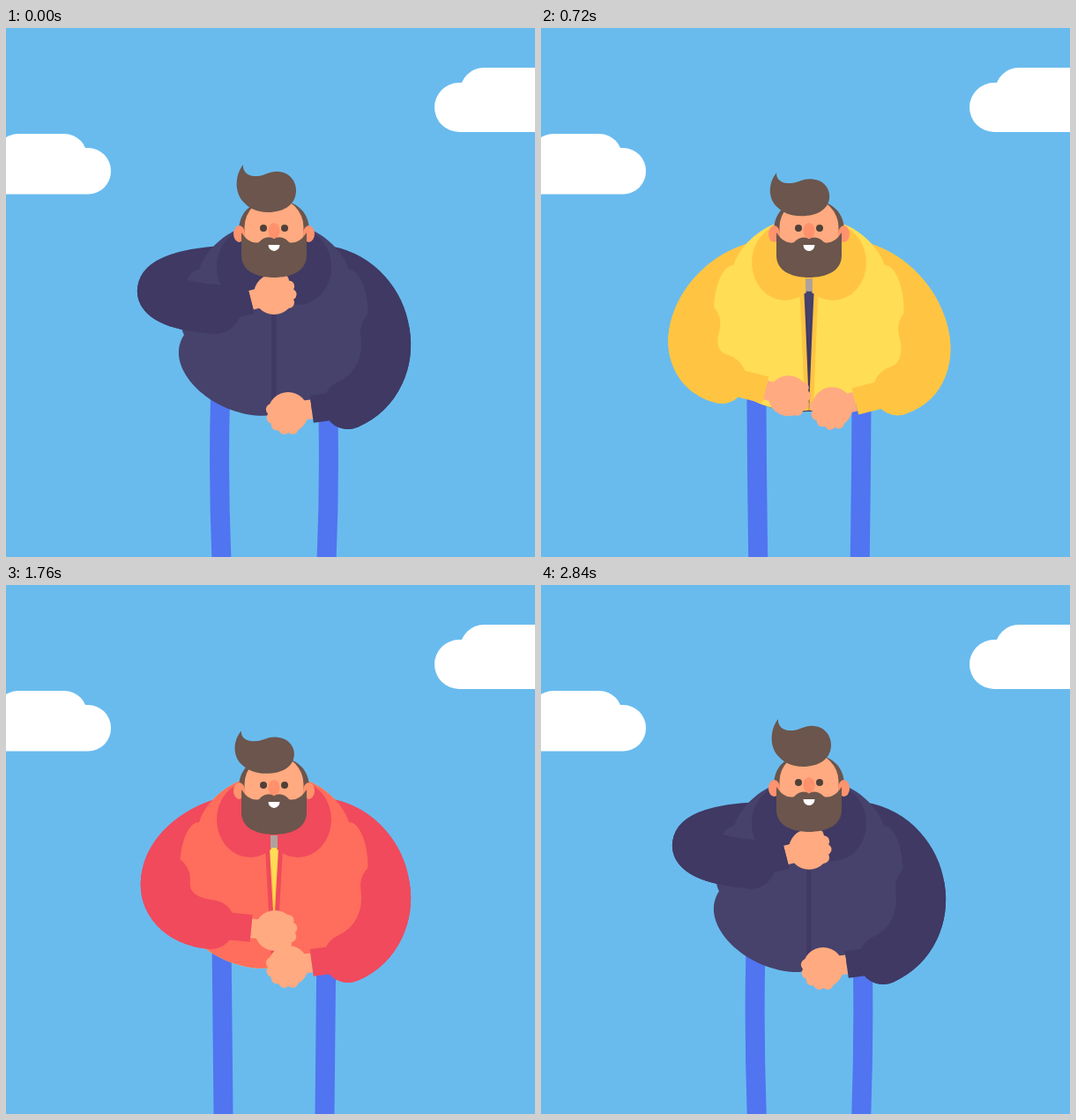
An HTML page with a canvas that plays this animation: 600x600 px, repeating every 2880 ms.

```html
<!DOCTYPE html>
<html lang="en">
<head>
<meta charset="utf-8">
<title>Jackets</title>
<style>
html, body { margin: 0; width: 100%; height: 100%; overflow: hidden; background: #69bbee; }
canvas { display: block; width: 600px; height: 600px; }
</style>
</head>
<body>
<canvas id="stage" width="600" height="600"></canvas>
<script>
const ctx = document.getElementById('stage').getContext('2d');
const CYCLE = 960, STEP = 40, MID = 304;
const SKY = '#69bbee', SKIN = '#ffaa80', BLUSH = '#ff936e', HAIR = '#6b554c', METAL = '#afa29d';
const JACKETS = [
  { main: '#46426b', dark: '#3f3963', lining: '#6040b8' },
  { main: '#ffdd55', dark: '#ffc542', lining: '#f7a531' },
  { main: '#ff6d5c', dark: '#f04a5c', lining: '#cf3350' }
];

// All figure coordinates count x outwards from the middle, so both sides share them.
// Jacket half: top, two seams, hem end and neck, then the bulge of the belly and of the zip edge.
const WING = [19,86, 101,69, 173,57, 226,153, 69,153, .7, .1];
const OPEN = [42,203, 106,237, 157,293, 96,393, 23,275, .55, .115];
const CLOSED = [4,222, 85,265, 102,339, 0,430, 0,285, .35, 0];
// Hood lobe: centre and radii.
const HOOD = { hang: [20,-2,63,41], fall: [40,121,44,41], open: [27,233,38,48], closed: [27,262,38,43] };

// Arm pose: elbow, wrist, hand.
const straightArm = (angle, reach) =>
  [70, reach - 72, reach].flatMap(r => [79 + r * Math.cos(angle), 240 + r * Math.sin(angle)]);
const CHIN = [127,297, 66,319, 0,302], BELT = [126,345, 84,427, 16,436];
const RAISED = straightArm(-.93, 219), SIDE = straightArm(.1, 184);
const REACH = [85,208, 84,150, 80,105], GRAB = [131,335, 110,398, 45,418];
const EMPTY_SLEEVE = [62,45, 82,-20, 115,-75];

const clamp = v => Math.min(1, Math.max(0, v));
const smooth = v => (v = clamp(v), v * v * (3 - 2 * v));
const mix = (a, b, k) => a.map((v, i) => v + (b[i] - v) * k);
const raise = (pose, dy) => pose.map((v, i) => i % 2 ? v - dy : v);

const armKeys = (rest, loose, zip) => [
  [0, ...rest], [120, ...loose], [280, ...REACH], [440, ...RAISED], [510, ...RAISED],
  [600, ...SIDE], [700, ...GRAB], [800, ...zip], [900, ...raise(rest, 3)]];
const ARMS = {
  '-1': armKeys(CHIN, [120,323, 86,322, 50,283], [123,334, 72,385, -1,392]),
  '1': armKeys(BELT, [144,338, 114,370, 70,384], raise(BELT, 4))
};
// Time, drop of the body, nod of the head.
const BOB = [[0, 9, -1], [120, 16, 2], [280, 0, 0], [440, 10, -1], [800, 4, 7], [880, 7.5, -3.5]];

// Smooth periodic interpolation without overshoot.
function track(keys, t) {
  const n = keys.length;
  const at = i => {
    const lap = Math.floor(i / n), [time, ...vals] = keys[i - lap * n];
    return { time: time + lap * CYCLE, vals };
  };
  let i = n - 1;
  while (i > 0 && keys[i][0] > t) i--;
  const [p, a, b, q] = [-1, 0, 1, 2].map(o => at(i + o));
  const span = b.time - a.time, u = (t - a.time) / span;
  const slope = (l, m, r, j) => {
    const before = m.vals[j] - l.vals[j], after = r.vals[j] - m.vals[j];
    return before * after <= 0 ? 0 : (before + after) / (r.time - l.time);
  };
  return a.vals.map((v, j) => {
    const d = b.vals[j] - v, m0 = slope(p, a, b, j) * span, m1 = slope(a, b, q, j) * span;
    return v + u * (m0 + u * (3 * d - 2 * m0 - m1 + u * (m0 + m1 - 2 * d)));
  });
}

function fill(color, path) {
  ctx.fillStyle = color;
  ctx.fill(typeof path === 'string' ? new Path2D(path) : path);
}
function stroke(color, width, path, cap = 'round') {
  ctx.strokeStyle = color;
  ctx.lineWidth = width;
  ctx.lineCap = cap;
  ctx.stroke(typeof path === 'string' ? new Path2D(path) : path);
}
function oval(color, x, y, rx, ry = rx, end = 2 * Math.PI) {
  const p = new Path2D();
  p.ellipse(x, y, rx, ry, 0, 0, end);
  fill(color, p);
}
const line = (color, width, x1, y1, x2, y2, cap) => stroke(color, width, `M${x1} ${y1}L${x2} ${y2}`, cap);
function placed(draw, x, y, angle = 0, sx = 1, sy = 1) {
  ctx.save();
  ctx.translate(x, y);
  ctx.rotate(angle);
  ctx.scale(sx, sy);
  draw();
  ctx.restore();
}
const side = (s, draw) => placed(() => draw(s), MID, 0, 0, s);
const both = draw => [-1, 1].forEach(s => side(s, draw));

function clouds() {
  const p = new Path2D();
  p.roundRect(-12, 120, 104, 60, 26);
  p.roundRect(-80, 136, 199, 52.5, 26);
  p.roundRect(515, 45, 160, 60, 27);
  p.roundRect(486, 62, 200, 56, 28);
  fill('#fff', p);
}

function legs(drop) {
  const knee = 55.5 + .7 * drop, hip = 58 + .33 * drop, foot = hip - 2;
  both(() => stroke('#5174f0', 22, `M${hip} 418Q${2 * knee - (hip + foot) / 2} 517 ${foot} 616`));
}

// A padded edge that swells to one side of the straight line between two points.
function puff(path, x1, y1, x2, y2, bulge) {
  const dx = x2 - x1, dy = y2 - y1;
  const at = k => [x1 + dx * k + dy * bulge, y1 + dy * k - dx * bulge];
  path.bezierCurveTo(...at(.05), ...at(.7), x2, y2);
}
function flap(pose, { main, dark }) {
  const outline = new Path2D(), edge = new Path2D();
  const [belly, bow] = pose.slice(10);
  outline.moveTo(pose[0], pose[1]);
  [.29, .22, belly, bow].forEach((b, i) => puff(outline, ...pose.slice(2 * i, 2 * i + 4), b));
  edge.moveTo(pose[6], pose[7]);
  puff(edge, ...pose.slice(6, 10), bow);
  fill(main, outline);
  stroke(dark, 5, edge, 'butt');
}
function hood([x, y, rx, ry], color) {
  both(() => oval(color, x, y, rx, ry));
  oval(color, MID, y - ry * .3, x * 1.5, ry * .68);
}
function puller(x, y, angle) {
  placed(() => {
    const triangle = new Path2D('M0 2L8 15L-8 15Z');
    ctx.lineJoin = 'round';
    fill(METAL, triangle);
    stroke(METAL, 4, triangle);
  }, x, y, angle);
}

function hand(kind, x, y, dir, s) {
  const spot = (deg, r) => [x + r * Math.cos(dir + deg * Math.PI / 180), y + r * Math.sin(dir + deg * Math.PI / 180)];
  oval(SKIN, x, y, kind === 'ball' ? 24.5 : 23);
  if (kind === 'open') {
    for (let i = 0; i < 4; i++) line(SKIN, 12.5, x, y, ...spot(23 - 29 * i, 31));
    line(SKIN, 13, ...spot(130, 12), ...spot(80, 23));
  } else if (kind === 'fist') {
    const turn = s < 0 ? 0 : -54, bumps = s < 0 ? 4 : 5;
    for (let i = 0; i < bumps; i++) oval(SKIN, ...spot(turn - 44 + 29 * i, 19), 6.5);
  }
}
function sleeve([mx, my, wx, wy], sx, sy, color, half) {
  // The curve passes through the elbow halfway.
  const spread = .35, cx = (8 * mx - sx - wx) / 6, cy = (8 * my - sy - wy) / 6;
  const c1 = [cx + spread * (sx - wx), cy + spread * (sy - wy)];
  const c2 = [cx - spread * (sx - wx), cy - spread * (sy - wy)];
  const wrist = [wx, wy], bend = mix(c2, wrist, .5), inner = mix(mix(c1, c2, .5), bend, .5);
  stroke(color, 56, half
    ? `M${mx} ${my}C${inner} ${bend} ${wrist}`
    : `M${sx} ${sy}C${c1} ${c2} ${wrist}`);
}
function cuffAndHand([, , x, y, hx, hy], color, kind, s) {
  const dir = Math.atan2(hy - y, hx - x);
  const cx = hx - 27 * Math.cos(dir), cy = hy - 27 * Math.sin(dir);
  line(SKIN, 22, cx, cy, hx, hy, 'butt');
  hand(kind, hx, hy, dir, s);
  line(color, 31, x, y, cx, cy, 'butt');
}

function head(eye, nod) {
  const squash = Math.max(0, nod);
  placed(() => {
    fill(HAIR, 'M-40 236C-42 209-26 195 0 195C26 195 42 209 40 236Z');
    const face = new Path2D();
    face.roundRect(-33.5, 193, 67, 60, [33, 33, 0, 0]);
    fill(SKIN, face);
    oval('#ff916c', 0, 230, 6.5, 9);
    for (const s of [-1, 1]) placed(() => {
      oval(BLUSH, 39.5, 233.5, 6.5, 9.5);
      oval('#4f4038', 12, 227, 4);
      fill(HAIR, 'M-1 240C6 235 12 238 17 243C23 245 30 241 34 236L37 232V258C37 275 21 283-1 283Z');
    }, 0, 0, 0, s);
    oval('#fff', 0, 246, 6.5, 7, Math.PI);
    placed(() => fill(HAIR, 'M-35-54C-36-45-28-40-18-41C-8-42-6-47 6-46C18-45 25-35 25-25' +
      'C25-9 12 0-7 0C-20 0-29-5-36-13C-46-26-43-44-35-54Z'),
      -.3 * squash, 209 + .7 * squash, 0, 1, 1 - .015 * squash);
  }, MID, eye - 227);
}

function draw(now) {
  const time = Math.floor(now / STEP) * STEP % (CYCLE * 3);
  const n = Math.floor(time / CYCLE), t = time % CYCLE;
  const inner = JACKETS[n], outer = JACKETS[(n + 1) % 3];
  const [drop, nod] = track(BOB, t);
  const pose = s => track(ARMS[s], t);
  const fall = Math.min(0, t - 280), don = clamp((t - 280) / 160), shut = smooth((t - 540) / 200);
  const worn = t >= 440, front = t < 180 || t > 650;
  const kind = t >= 60 && t < 180 ? 'ball' : front ? 'fist' : 'open';
  const armColor = worn ? outer.dark : inner.dark, shoulder = [60, 266 + drop];

  ctx.fillStyle = SKY;
  ctx.fillRect(0, 0, 600, 600);
  clouds();

  if (!worn) {
    const [y, rx, ry] = mix([120 + fall, 215, 75], [240, 95, 80], don);
    const early = t < 200, rim = early ? 5 : 0;
    if (early) oval(outer.dark, MID, y, rx, ry, Math.PI);
    oval(early ? outer.main : outer.lining, MID, y, rx - rim, ry - rim, Math.PI);
  }
  legs(drop);

  if (!worn) both(s => {
    sleeve(pose(s), ...shoulder, armColor);
    if (!front && t <= 280) cuffAndHand(pose(s), armColor, kind, s);
  });
  if (t < 820) placed(() => {
    both(() => flap(CLOSED, inner));
    hood(HOOD.closed, inner.dark);
    puller(MID, 279, .4 * Math.sin(clamp(t / 240) * Math.PI));
  }, 0, drop);

  both(s => {
    const arm = worn ? pose(s) : mix(raise(EMPTY_SLEEVE, -fall), RAISED, don);
    sleeve(arm, ...mix([62, 110 + fall], shoulder, don), outer.dark);
    if (!front && t >= 280) cuffAndHand(arm, outer.dark, 'open', s);
  });

  placed(() => {
    const half = mix(mix(WING, OPEN, don), CLOSED, shut);
    for (let i = 1; i < 10; i += 2) half[i] += fall;
    const gap = t < 700 ? 0 : 8 * clamp((890 - t) / 90);
    half[8] += gap;
    both(() => flap(half, outer));
    const hanging = mix(HOOD.hang, HOOD.fall, clamp((t - 120) / 160));
    hanging[1] += Math.min(0, t - 120);
    hood(mix(mix(hanging, HOOD.open, don), HOOD.closed, shut), outer.dark);
    if (gap) {
      fill(inner.main, `M${MID - gap / 2} 280h${gap}L${MID} 362Z`);
      fill(METAL, `M${MID - gap / 2} 280h${gap}v14h${-gap}Z`);
    }
    if (t < 700) side(-1, () => puller(half[6], half[7], -Math.PI / 2));
  }, 0, t < 280 ? 0 : drop);

  if (front) [1, -1].forEach(s => side(s, () => {
    cuffAndHand(pose(s), armColor, kind, s);
    sleeve(pose(s), ...shoulder, armColor, true);
  }));
  head(213.5 + 1.6 * drop + nod, nod);
}

function loop() {
  draw(performance.now());
  requestAnimationFrame(loop);
}
loop();
</script>
</body>
</html>
```
